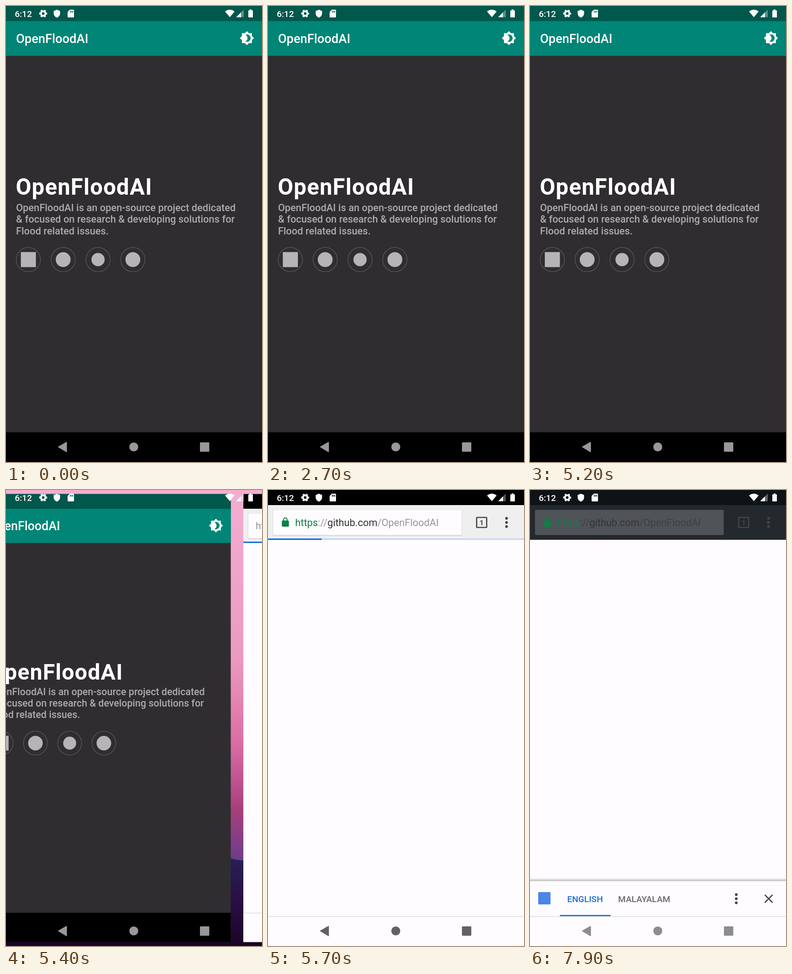
These frames come from a looping animation (561 px wide and 998 px high, 8 s). An HTML page:

```html
<!DOCTYPE html>
<html lang="en">
<head>
<meta charset="utf-8">
<title>App to browser transition</title>
<style>
  html, body { margin: 0; width: 100%; height: 100%; overflow: hidden; background: #000; }
  svg { display: block; width: 561px; height: 998px; font-family: Roboto, sans-serif; }
  .medium { font-weight: 500; }
  .blurb { font-size: 21.84px; fill: #acabad; }
  .url { font-size: 21.8px; }
  .tab { font-size: 19.1px; }
</style>
</head>
<body>
<svg viewBox="0 0 561 998">
  <defs>
    <linearGradient id="sky" x2="0" y2="1">
      <stop offset="0" stop-color="#f3aed1"/>
      <stop offset=".37" stop-color="#eb9abf"/>
      <stop offset=".55" stop-color="#dc6fa5"/>
      <stop offset=".7" stop-color="#a83f7d"/>
      <stop offset=".81" stop-color="#6d3d8c"/>
    </linearGradient>
    <linearGradient id="hill" x2="0" y2="1">
      <stop offset="0" stop-color="#25265c"/>
      <stop offset=".6" stop-color="#2a0d42"/>
      <stop offset="1" stop-color="#190526"/>
    </linearGradient>
    <linearGradient id="shade" x2="0" y2="1">
      <stop offset="0" stop-color="#000" stop-opacity="0"/>
      <stop offset="1" stop-color="#000" stop-opacity=".25"/>
    </linearGradient>
    <g id="dots"><circle cy="-9" r="3"/><circle r="3"/><circle cy="9" r="3"/></g>
  </defs>

  <rect width="561" height="998" fill="url(#sky)"/>
  <path d="M0 770Q250 770 492 806Q510 813 561 811V998H0Z" fill="url(#hill)"/>

  <g id="app">
    <rect width="561" height="998" fill="#302d30"/>
    <rect width="561" height="33" fill="#00574b"/>
    <rect y="33" width="561" height="76" fill="#008577"/>
    <rect y="933" width="561" height="65"/>
    <text class="medium" x="22" y="81" font-size="27.3" fill="#fff">OpenFloodAI</text>
    <path transform="translate(511.6 54) scale(1.364)" fill="#fff" fill-rule="evenodd"
      d="M20 8.7V4h-4.7L12 .7 8.7 4H4v4.7L.7 12 4 15.3V20h4.7l3.3 3.3 3.3-3.3H20v-4.7l3.3-3.3zM12 18c-.9 0-1.7-.2-2.5-.55C11.56 16.5 13 14.4 13 12s-1.44-4.5-3.5-5.45C10.3 6.2 11.1 6 12 6a6 6 0 0 1 0 12z"/>
    <text x="21.5" y="413" font-size="49.1" font-weight="700" letter-spacing="1.2" fill="#fff">OpenFloodAI</text>
    <g class="medium blurb">
      <text x="22" y="448.5">OpenFloodAI is an open-source project dedicated</text>
      <text x="22" y="474">&amp; focused on research &amp; developing solutions for</text>
      <text x="22" y="499.5">Flood related issues.</text>
    </g>
    <g fill="none" stroke="#5c5a5d" stroke-width="1.3">
      <circle cx="49" cy="555" r="26.6"/><circle cx="125.3" cy="555" r="26.6"/>
      <circle cx="201.7" cy="555" r="26.6"/><circle cx="278" cy="555" r="26.6"/>
    </g>
    <g fill="#b6b4b7">
      <rect x="32.5" y="538.5" width="33" height="33"/>
      <circle cx="125.3" cy="555" r="16.3"/><circle cx="201.7" cy="555" r="14.5"/><circle cx="278" cy="555" r="16.3"/>
    </g>
  </g>

  <g id="browser">
    <rect width="561" height="998" fill="#fefcfe"/>
    <rect id="statusBg" width="561" height="33"/>
    <rect id="toolbar" y="33" width="561" height="76"/>
    <rect id="fieldShadow" x="10" y="43" width="415.5" height="57.5" rx="3" fill="#d6d5d7"/>
    <rect id="field" x="11" y="43.5" width="413.5" height="55" rx="2"/>
    <g id="progress">
      <rect y="106" width="561" height="3.2" fill="#c3d7f3"/>
      <rect id="bar" y="106" width="561" height="3.2" fill="#1a6fe0"/>
    </g>
    <text id="plainUrl" class="url" x="27.5" y="79" fill="#979698">https://github.com/OpenFloodAI</text>
    <g id="secureUrl">
      <path transform="translate(26.4 59) scale(.97)" fill="#0b8043" fill-rule="evenodd"
        d="M18 8h-1V6A5 5 0 0 0 7 6v2H6a2 2 0 0 0-2 2v10a2 2 0 0 0 2 2h12a2 2 0 0 0 2-2V10a2 2 0 0 0-2-2zM9 8V6a3 3 0 0 1 6 0v2z"/>
      <text class="url" x="59.5" y="79"><tspan fill="#0b8043">https</tspan><tspan class="dim">://</tspan><tspan fill="#333">github.com</tspan><tspan class="dim">/OpenFloodAI</tspan></text>
    </g>
    <g fill="#454649">
      <rect x="457.2" y="60" width="22" height="22" rx="1" fill="none" stroke="#454649" stroke-width="2.7"/>
      <text x="468.2" y="76.5" font-size="15.5" font-weight="700" text-anchor="middle">1</text>
      <use href="#dots" x="522.7" y="71"/>
    </g>
    <g id="infobar">
      <rect y="849" width="561" height="7" fill="url(#shade)"/>
      <rect y="856" width="561" height="78" fill="#fefcfe"/>
      <rect x="18" y="880" width="27" height="27" rx="2" fill="#4a86e8"/>
      <text class="medium tab" x="81.5" y="902" fill="#1a6fd8">ENGLISH</text>
      <text class="medium tab" x="193" y="902" fill="#69686a">MALAYALAM</text>
      <rect x="65.500" y="930" width="111" height="3" fill="#1a6fd8"/>
      <use href="#dots" x="452" y="894.5" fill="#444"/>
      <path d="M514.5 886l17 17m0-17l-17 17" stroke="#48474a" stroke-width="2.6"/>
    </g>
    <rect y="933" width="561" height="65" fill="#fefcfe"/>
    <rect y="932.7" width="561" height="1.5" fill="#dcdbdd"/>
  </g>

  <g fill="#fff">
    <text class="medium" x="19.200" y="23.5" font-size="19.1">6:12</text>
    <circle cx="81.500" cy="16.500" r="4.900" fill="none" stroke="#fff" stroke-width="4"/>
    <circle cx="81.500" cy="16.500" r="7.4" fill="none" stroke="#fff" stroke-width="2.8" stroke-dasharray="4 3.75" stroke-dashoffset="2"/>
    <path d="M111.500 8l7 3v5c0 4.500-3 8-7 9.500-4-1.500-7-5-7-9.500v-5z"/>
    <path fill-rule="evenodd" d="M140 8h7.500q1.500 0 1.500 1.500v14q0 1.500-1.500 1.500h-11q-1.500 0-1.500-1.500V13zM140 10.500v4h1.500v-4zm2.800 0v4h1.500v-4zm2.800 0v4h1.500v-4z"/>
    <path d="M480 12Q490.500 4 501 12L490.500 24.500Z"/>
    <path d="M521 8V24.500H504.500Z" opacity=".35"/>
    <path d="M515 14V24.500H504.500Z"/>
    <path d="M534 7.500h4v2h2q1 0 1 1V24q0 1-1 1h-8q-1 0-1-1V10.500q0-1 1-1h2z"/>
  </g>
  <g id="nav">
    <path d="M115 965L132.500 955V975.500Z" stroke-width="2" stroke-linejoin="round"/>
    <circle cx="280" cy="965" r="9.800" stroke="none"/>
    <rect x="425" y="955" width="20.500" height="20.500" rx="1.500" stroke="none"/>
  </g>
</svg>
<script>
const LOOP = 8000, STEP = 100, W = 561, H = 998;
const SLIDE_START = 5353, SLIDE_SPEED = 1.77;
const el = Object.fromEntries([...document.querySelectorAll("[id]")].map(e => [e.id, e]));
const dimText = document.querySelectorAll(".dim");

const ramp = (t, from, to) => Math.min(1, Math.max(0, (t - from) / (to - from)));
const mix = (a, b, k) => `color-mix(in srgb, ${b} ${k * 100}%, ${a})`;
const show = (e, on) => e.style.display = on ? "" : "none";

// Cubic Bezier easing with control points (x1, 0) and (x2, 1)
function ease(x, x1, x2) {
  let lo = 0, hi = 1;
  for (let i = 0; i < 24; i++) {
    const s = (lo + hi) / 2, r = 1 - s;
    if (3 * r * r * s * x1 + 3 * r * s * s * x2 + s * s * s < x) lo = s; else hi = s;
  }
  return 3 * (1 - lo) * lo * lo + lo ** 3;
}

function place(window, dx, scale) {
  window.setAttribute("transform",
    `translate(${W / 2} ${H / 2}) scale(${scale}) translate(${dx - W / 2} ${-H / 2})`);
}

function draw(t) {
  // Both windows shrink, slide left side by side, then grow back
  const s = (t - SLIDE_START) * SLIDE_SPEED;
  const scale = 1 - .05 * ease(ramp(s, 0, 283), .4, .2) + .05 * ease(ramp(s, 283, 600), .4, .2);
  const shift = 1.05 * W * ease(ramp(s, 50, 433), .2, 0);
  place(el.app, -shift, scale);
  place(el.browser, 1.05 * W - shift, scale);

  show(el.plainUrl, t < 5600);
  show(el.secureUrl, t >= 5600);

  const loaded = .21 + .05 * ramp(t, 5700, 6000) + .74 * ramp(t, 6000, 6900);
  el.bar.setAttribute("width", W * loaded);
  el.progress.style.opacity = 1 - ramp(t, 7200, 7500);

  const theme = ramp(t, 7700, 7900);
  el.statusBg.style.fill = mix("#000", "#101316", ramp(t, 7300, 7600));
  el.toolbar.style.fill = mix("#f0eff0", "#24292e", theme);
  el.field.style.fill = mix("#fefcfe", "#505458", theme);
  el.fieldShadow.style.opacity = 1 - theme;
  dimText.forEach(e => e.style.fill = mix("#979698", "#3d4043", theme));

  const rise = ramp(t, 7700, 7900);
  show(el.infobar, rise > 0);
  el.infobar.setAttribute("transform", `translate(0 ${85 * (1 - rise)})`);

  const navColor = t < 5500 ? "#99979a" : mix("#626163", "#8d8c8e", ramp(t, 6100, 6900));
  el.nav.style.fill = el.nav.style.stroke = navColor;
}

const start = performance.now();
function tick() {
  const t = (performance.now() - start) % LOOP;
  draw(Math.floor(t / STEP) * STEP);
  requestAnimationFrame(tick);
}
tick();
</script>
</body>
</html>
```
